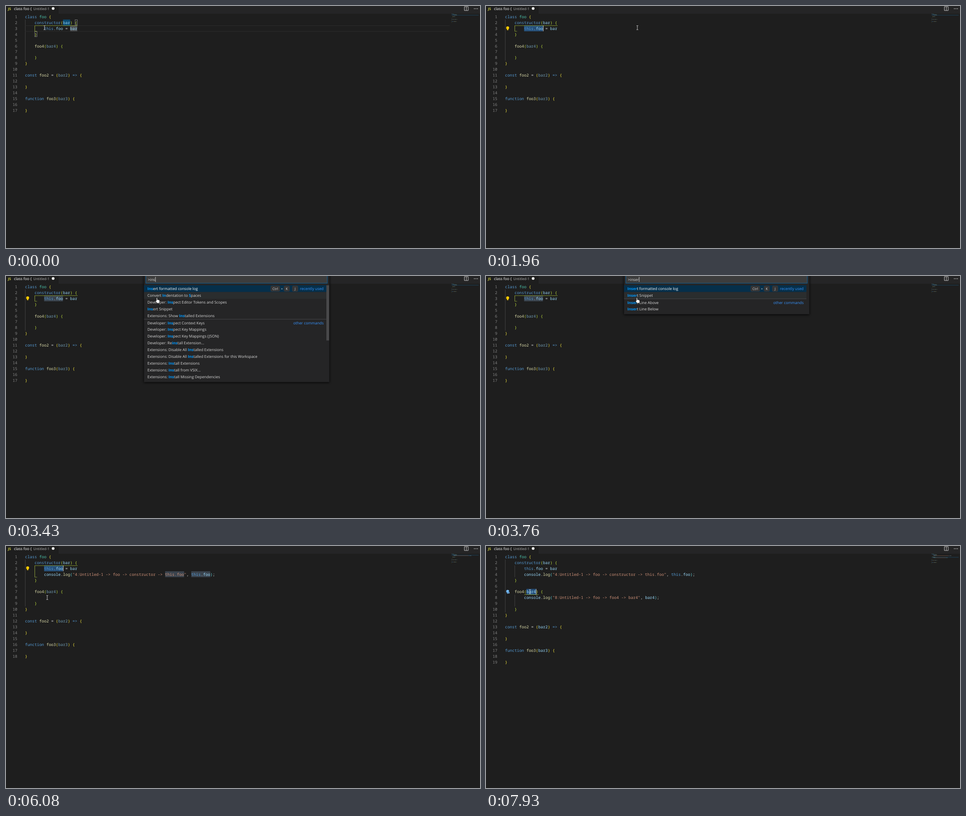
Recreate the animation shown at these times as an HTML page. Size 1046 by 535 pixels, loop 8 s.

```html
<!DOCTYPE html>
<html lang="en">
<head>
<meta charset="utf-8">
<style>
  html, body { margin: 0; width: 100%; height: 100%; overflow: hidden; background: #1e1e1e; }
  svg { display: block; width: 1046px; height: 535px; }
  text { white-space: pre; text-rendering: geometricPrecision; }
  .code { font: 500 8.73px "Noto Sans Mono", "DejaVu Sans Mono", monospace; }
  .ui { font: 8.38px "Open Sans", "Noto Sans", sans-serif; fill: #d8d8d8; }
  .key { font-size: 7.6px; text-anchor: middle; }
  .hit { fill: #0097fb; font-weight: 700; }
</style>
</head>
<body>
<svg id="stage" viewBox="0 0 1046 535"></svg>
<script>
const LOOP = 8000, CHAR = 5.24, ROW = 12.965, LEFT = 42, TOP = 17;
const PALETTE_OPEN = 2200, PALETTE_CLOSE = 4500, FIRST_LOG = 4620, SECOND_LOG = 7800;
const BRACKETS = ['#f2e33c', '#bcdc3c', '#62d2dc'];
const stage = document.getElementById('stage');

const rect = (x, y, w, h, fill, more = '') =>
  `<rect x="${x}" y="${y}" width="${w}" height="${h}" fill="${fill}" ${more}/>`;
const label = (x, y, content, cls = 'ui', more = '') =>
  `<text x="${x}" y="${y}" class="${cls}" ${more}>${content}</text>`;
const path = (d, stroke, more = '') => `<path d="${d}" fill="none" stroke="${stroke}" ${more}/>`;
const colX = col => LEFT + col * CHAR;
const rowY = line => TOP + (line - 1) * ROW;
const mark = (line, col, count, fill, more = '') =>
  rect(colX(col), rowY(line), count * CHAR, ROW, fill, more);
const between = (t, from, to) => t >= from && t < to;

// Code

function codeLines(logs) {
  const first = '        console.log("4:Untitled-1 -> foo -> constructor -> this.foo", this.foo);';
  const second = '        console.log("8:Untitled-1 -> foo -> foo4 -> bar4", bar4);';
  return [
    'class foo {', '    constructor(bar) {', '        this.foo = bar',
    ...(logs > 0 ? [first] : []),
    '    }', '', '    foo4(bar4) {',
    ...(logs > 1 ? [second, '        '] : ['']),
    '    }', '}', '', 'const foo2 = (bar2) => {', '', '}', '',
    'function foo3(bar3) {', '', '}'
  ];
}

function wordColor(word, line) {
  if (/^(class|constructor|const|function|this|=>)$/.test(word)) return '#569cd6';
  if (word[0] === '"') return '#ce9178';
  if (word === 'foo' && line.startsWith('class')) return '#4ec9b0';
  if (/^(foo\d|log)$/.test(word)) return '#dcdcaa';
  return /\w/.test(word) ? '#9cdcfe' : '#d4d4d4';
}

function tokenize(lines) {
  let depth = 0;
  return lines.map(line => [...line.matchAll(/"[^"]*"|\w+|=>|\S/g)].map(match => {
    const word = match[0];
    let color = wordColor(word, line);
    if (/^[{(]$/.test(word)) color = BRACKETS[depth++];
    if (/^[})]$/.test(word)) color = BRACKETS[--depth];
    return { word, col: match.index, color };
  }));
}

const versions = [0, 1, 2].map(logs => {
  const lines = codeLines(logs);
  return { lines, tokens: tokenize(lines) };
});

function drawCode({ tokens }, dimmed) {
  return tokens.map((row, i) => {
    const y = rowY(i + 1) + 9.7;
    const words = row.map(({ word, col, color }) => {
      const faded = dimmed && /^bar\d$/.test(word) ? ' fill-opacity=".67"' : '';
      return `<tspan x="${colX(col)}" fill="${color}"${faded}>${word}</tspan>`;
    }).join('');
    return label(25, y, i + 1, 'code', 'fill="#858585" text-anchor="end"') +
      `<text y="${y}" class="code">${words}</text>`;
  }).join('');
}

function drawGuides(lines) {
  const end = lines.indexOf('}') + 1;
  const inner = lines.map((line, i) =>
    line.startsWith('        ') ? rect(63, rowY(i + 1), 1, ROW, '#404040') : '').join('');
  return rect(42, rowY(2), 1, rowY(end) - rowY(2), '#404040') + inner;
}

function drawMinimap({ tokens }, activeLine) {
  const lineY = i => 17.4 + i * 1.17;
  return rect(983, lineY(activeLine - 1), 60, 1, '#1c4058') +
    tokens.map((row, i) => row.map(({ word, col, color }) =>
      rect(983 + col * .55, lineY(i), word.length * .55, .7, color, 'opacity=".5"')).join('')).join('');
}

function drawBulb(line, color) {
  const y = rowY(line) + 5.3;
  return `<circle cx="47.8" cy="${y}" r="3.2" fill="${color}"/>` +
    rect(46.3, y + 2, 3, 3.2, color) +
    (line === 7 ? `<circle cx="50.3" cy="${y + 3.2}" r="2" fill="${color}" stroke="#1e1e1e" stroke-width=".6"/>` : '');
}

// Pointer

const TRACK = [
  [0, 85, 48], [220, 85, 48], [600, 128, 50.5], [1300, 128, 50.5], [1510, 334, 48],
  [5470, 334, 48], [5550, 356, 55], [5840, 356, 55], [6080, 91, 114],
  [6250, 91, 114], [6480, 97, 101], [LOOP, 97, 101]
];

function pointerAt(t) {
  const next = TRACK.findIndex(key => key[0] > t);
  const [t0, x0, y0] = TRACK[next - 1], [t1, x1, y1] = TRACK[next];
  const p = (t - t0) / (t1 - t0), eased = p * p * (3 - 2 * p);
  return { x: x0 + (x1 - x0) * eased, y: y0 + (y1 - y0) * eased };
}

function pressAmount(t) {
  const press = (from, to) => Math.max(0, Math.min(1, (t - from) / 60, (to - t) / 70));
  return Math.max(press(140, 1040), press(6480, 6560), press(6570, 6720));
}

function drawPointer(t) {
  const { x, y } = pointerAt(t);
  if (between(t, 2300, PALETTE_CLOSE)) {
    return `<path transform="translate(${x} ${y + 5.5})" fill="#fff" stroke="#111" stroke-width=".7"
      d="M-2 1V-5Q-1-6.5 0-5V-1Q1.2-2 2-.6Q3.2-1.5 4-.1Q5-.6 5 .8V3Q5 5 3.8 6.5H-.8L-3.6 2.2Q-3.6 .6-2 1Z"/>`;
  }
  const press = pressAmount(t);
  const beam = `M${x - 2} ${y - 4.5}h1.5l.5.5l.5-.5h1.5M${x} ${y - 4}v8M${x - 2} ${y + 4.5}h1.5l.5-.5l.5.5h1.5`;
  return (press ? `<circle cx="${x}" cy="${y + .5}" r="6.7" fill="#d8cc14" opacity="${press * .68}"/>` : '') +
    path(beam, '#d8d8d8', 'stroke-width=".9"');
}

// Selection, highlights and bracket scope

function drawEditor(t) {
  const logs = t >= SECOND_LOG ? 2 : t >= FIRST_LOG ? 1 : 0;
  const version = versions[logs];
  const onParam = t >= 6500;
  const dragged = Math.max(0, Math.min(8, Math.round((pointerAt(Math.min(t, 600)).x - 84) / CHAR)));
  let back = drawGuides(version.lines), front = '';

  if (!onParam) {
    const bottom = rowY(logs ? 5 : 4);
    if (!dragged) {
      back += rect(42, 43, 937, 1, '#2c2c2c') + rect(42, 55.5, 937, 1, '#2c2c2c');
      for (const [line, col] of [[2, 21], [4, 4]])
        front += rect(colX(col) + .3, rowY(line) + .5, CHAR, ROW - 1.5, 'none', 'stroke="#888" stroke-width=".8"');
      if (t < 170) back += mark(2, 16, 3, '#0b4a70') + mark(3, 19, 3, '#4b4d4f');
    }
    front += path(`M158 43.5H63.5V${bottom}h5`, BRACKETS[1], 'opacity=".6"');
    const active = !between(t, 2160, PALETTE_CLOSE);
    back += mark(3, 8, dragged, active ? '#264f78' : '#3a434d', 'rx="1"');
    if (dragged === 1)
      for (const [line, col] of [[2, 8], [2, 12], [11, 4], [15, 4]]) back += mark(line, col, 1, '#343a41');
    if (between(t, 4900, 6500)) back += mark(4, 59, 8, '#3a434d') + mark(4, 70, 8, '#3a434d');
    const blinkOff = between(t, 1460, 1960) || between(t, 5010, 5510);
    if (t > 170 && active && !blinkOff) front += rect(colX(8 + dragged), rowY(3), 1, ROW, '#d0d0d0');
    if (t >= 780) front += drawBulb(3, '#ffcc00');
  } else {
    const selected = t >= 6570;
    if (selected) back += mark(7, 9, 4, '#264f78', 'rx="1"');
    front += path('M84.5 107.5H116', BRACKETS[1], 'opacity=".6"');
    if (!between(t, 7130, 7630)) front += rect(colX(selected ? 13 : 10), rowY(7), 1, ROW, '#d0d0d0');
    if (t >= 6950) front += drawBulb(7, '#75beff');
  }
  const dimmed = t < FIRST_LOG || between(t, 4990, SECOND_LOG);
  return back + drawCode(version, dimmed) + front + drawMinimap(version, onParam ? 7 : 3);
}

function drawTabs() {
  return rect(0, 0, 1046, 17, '#252526') + rect(0, 0, 116, 17, '#1e1e1e') +
    label(4.3, 8.6, 'JS', 'ui', 'style="fill:#cbcb41;font-weight:700;font-size:7.6px"') +
    label(17.5, 9, 'class foo {', 'ui', 'style="fill:#fff"') +
    label(60.3, 9, 'Untitled-1', 'ui', 'style="font-size:7.7px;fill:#b4b4b4"') +
    '<circle cx="104" cy="5.5" r="3" fill="#fff"/>' +
    path('M1011.5 1.5h8.5v8.5h-8.5zM1015.8 1.5v8.5', '#c5c5c5') +
    [1033.5, 1037, 1040.5].map(x => `<circle cx="${x}" cy="6" r=".9" fill="#c5c5c5"/>`).join('');
}

// Command palette: brackets wrap matched letters, a bar precedes the shortcut

const recent = [
  '[I]nsert formatted console log|Ctrl+K J', 'Turbo Console Log: D[i]splay Log Message|Ctrl+Alt+L',
  'L[i]ve Server: Open with Live Server|Alt+L Alt+O', 'JavaScr[i]pt: Go to Project Configuration',
  'ESL[i]nt: Create ESLint configuration', 'Convert [I]ndentation to Spaces',
  'Preferences: Conf[i]gure User Snippets', 'Developer: [I]nspect Editor Tokens and Scopes',
  'Developer: Generate Color Theme From Current Sett[i]ngs', 'L[i]ve Sass: Open Live Sass Output Window',
  'Emmet: Wrap w[i]th Abbreviation|Ctrl+Alt+N', '[I]cons: Activate VSCode Icons',
  'Preferences: Open User Sett[i]ngs', '[I]nsert Snippet'
];
const inspect = ['Context Keys', 'Key Mappings', 'Key Mappings (JSON)'];
const inserts = typed => ['formatted console log|Ctrl+K J', 'Snippet', 'Line Above', 'Line Below']
  .map(rest => `[${typed}]${'Insert'.slice(typed.length)} ${rest}`);

const SEARCHES = [
  { at: PALETTE_OPEN, query: '', thumb: 14, rows: recent.map(row => row.replace(/[[\]]/g, '')) },
  { at: 2660, query: 'i', thumb: 14, rows: recent },
  { at: 3020, query: 'in', thumb: 40, other: 9, rows: [
    '[In]sert formatted console log|Ctrl+K J', 'ESL[in]t: Create ESLint configuration',
    'Convert [In]dentation to Spaces', 'Developer: [In]spect Editor Tokens and Scopes',
    'Developer: Generate Color Theme From Current Sett[in]gs',
    'Live Sass: Open Live Sass Output W[in]dow', 'Preferences: Open User Sett[in]gs',
    '[In]sert Snippet', 'Extensions: Show [In]stalled Extensions',
    ...inspect.map(name => `Developer: [In]spect ${name}`),
    'Developer: Re[in]stall Extension...', 'Extensions: Disable All [In]stalled Extensions'] },
  { at: 3430, query: 'ins', thumb: 122, other: 5, rows: [
    '[Ins]ert formatted console log|Ctrl+K J', 'Convert [In]dentation to [S]paces',
    'Developer: [Ins]pect Editor Tokens and Scopes', '[Ins]ert Snippet',
    'Extensions: Show [Ins]talled Extensions',
    ...inspect.map(name => `Developer: [Ins]pect ${name}`),
    'Developer: Re[ins]tall Extension...', 'Extensions: Disable All [Ins]talled Extensions',
    'Extensions: Disable All [Ins]talled Extensions for this Workspace',
    'Extensions: [Ins]tall Extensions', 'Extensions: [Ins]tall from VSIX...',
    'Extensions: [Ins]tall Missing Dependencies'] },
  { at: 3570, query: 'inse', other: 2, rows: [
    ...inserts('Inse'), 'Developer: [Ins]p[e]ct Editor Tokens and Scopes',
    ...inspect.map(name => `Developer: [Ins]p[e]ct ${name}`),
    'Extensions: [Ins]tall [E]xtensions', 'Extensions: Show [Ins]talled [E]xtensions',
    'Developer: Re[ins]tall [E]xtension...'] },
  { at: 3760, query: 'inser', other: 2, rows: inserts('Inser') },
  { at: 4010, query: 'insert', other: 2, rows: inserts('Insert') }
];

function drawKeys(shortcut, right, y) {
  let x = right, out = '';
  for (const part of shortcut.split(/([+ ])/).reverse()) {
    if (part === ' ') { x -= 6.3; continue; }
    const width = part === '+' ? 9.3 : { Ctrl: 20, Alt: 16.6 }[part] || 12.2;
    x -= width;
    if (part !== '+') out += rect(x, y - 6, width, 12, '#343435', 'rx="2" stroke="#3f3f40" stroke-width=".6"');
    out += label(x + width / 2, y + 2.8, part, 'ui key');
  }
  return out;
}

function drawPalette(t) {
  if (!between(t, PALETTE_OPEN, PALETTE_CLOSE)) return '';
  const { query, rows, other, thumb } = SEARCHES.filter(search => search.at <= t).pop();
  const height = 24.5 + rows.length * 15;
  const caretX = 318.2 + [0, 2.1, 7.2, 11.2, 15.9, 19.3, 22.3][query.length];
  let out = rect(304.5, -6, 409, height + 6, '#252526', 'style="filter:drop-shadow(0 1px 2.5px #000)"') +
    rect(308.5, -4, 400.5, 20, '#3c3c3c', 'stroke="#0e639c"') +
    label(313, 10.8, '>' + query) + rect(caretX, 2, .9, 11, '#ddd') +
    rect(304.5, 20.5, 402.5, 15, '#062f4a') + rect(304.5, 35.5, 402.5, 15, '#2a2d2e');
  rows.forEach((row, i) => {
    const [name, keys] = row.split('|'), y = 28 + i * 15 + (i === other ? .8 : 0);
    const note = i === 0 ? 'recently used' : i === other ? 'other commands' : '';
    out += label(312, y + 3, name.replace(/\[(.*?)\]/g, '<tspan class="hit">$1</tspan>'), 'ui',
      i ? '' : 'style="fill:#fff"');
    if (note) out += label(701, y + 3, note, 'ui', 'text-anchor="end" style="fill:#3794ff"');
    if (i === other) out += rect(304.5, y - 8.8, 402.5, 1, '#444448');
    if (keys) out += drawKeys(keys, note ? 644.2 : 701, y);
  });
  return out + (thumb ? rect(707, 20.5, 6, thumb, '#48484a') : '');
}

function render(t) {
  stage.innerHTML = rect(0, 0, 1046, 535, '#1e1e1e') + drawTabs() + drawEditor(t) + drawPalette(t) + drawPointer(t);
}

const start = performance.now();
function tick() {
  render((performance.now() - start) % LOOP);
  requestAnimationFrame(tick);
}
tick();
</script>
</body>
</html>
```
